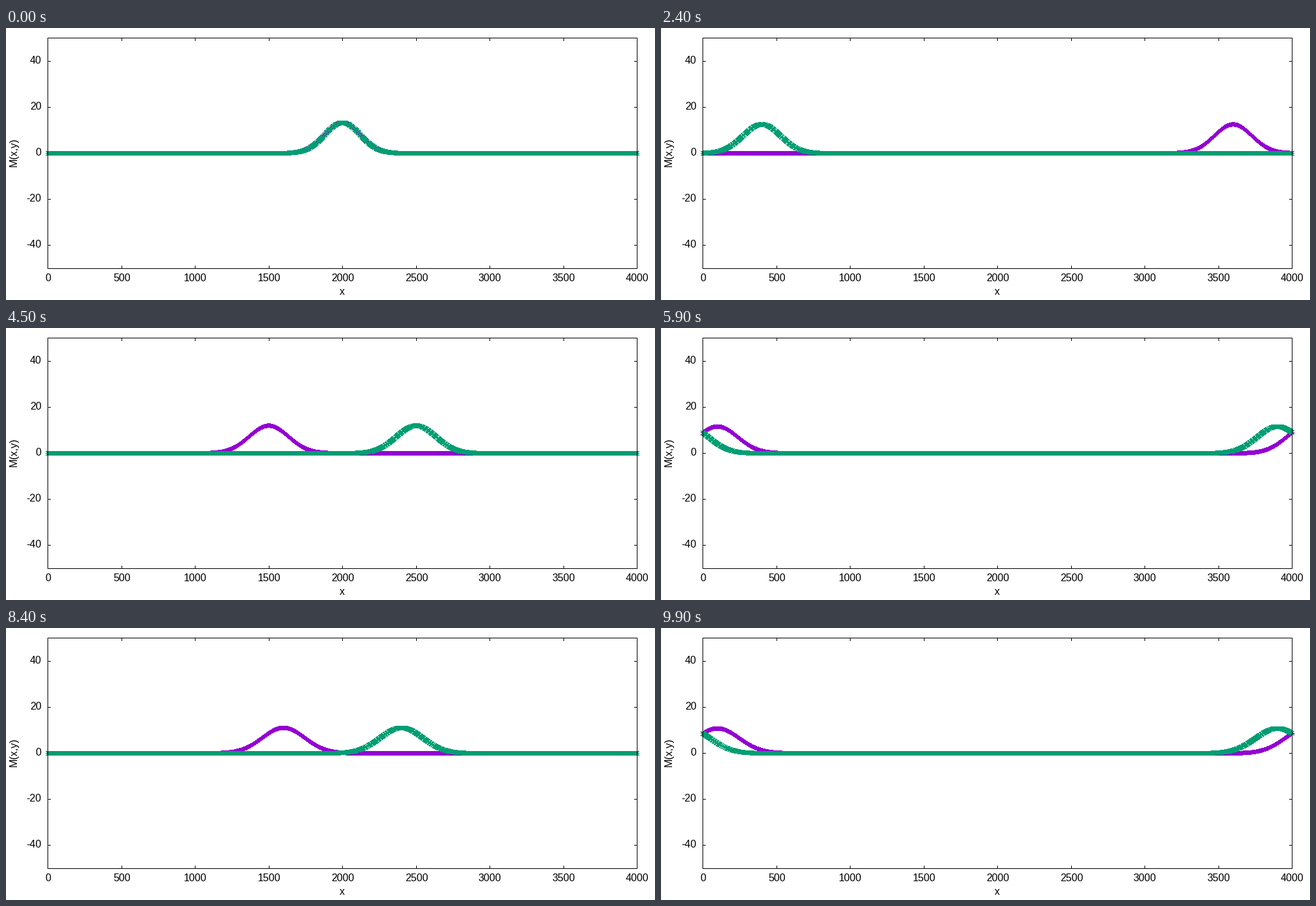
These frames come from a looping animation (1000 px wide and 420 px high, 10 s). A matplotlib script:

```python
import numpy as np
import matplotlib.pyplot as plt
from matplotlib.animation import FuncAnimation

W, H, DPI = 1000, 420, 100
LEFT, RIGHT, TOP, BOTTOM = 64, 972, 15, 371
SPAN, YMAX = 4000, 50
FRAMES, INTERVAL = 100, 100

PURPLE, GREEN, BLACK = (148, 0, 211), (0, 158, 115), (0, 0, 0)
ARM = 3      # half size of a marker
TICK = 4     # tick length beyond the border

# pulse: mass, start width, spreading and skew gained per step
MASS, SIGMA, SPREAD, SKEW = 4000, 120, 75, -272
SPEED = 100

grid = np.arange(SPAN + 1)


def col(x):
    return LEFT + np.floor(x * (RIGHT - LEFT) / SPAN + 0.5).astype(int)


def row(y):
    up = (y + YMAX) * (BOTTOM - TOP) / (2 * YMAX)
    return BOTTOM - np.floor(up + 0.5).astype(int)


def pulse(n):
    """Right-moving pulse on a periodic line after n steps."""
    d = (grid - SPEED * n) % SPAN - SPAN / 2
    s = np.sqrt(SIGMA ** 2 + SPREAD * n)
    z = d / s
    bell = MASS / (s * np.sqrt(2 * np.pi)) * np.exp(-z * z / 2)
    return bell * (1 + SKEW * n / (6 * s ** 3) * (z ** 3 - 3 * z))


def draw_ticks(img):
    for c in col(np.arange(0, SPAN + 1, 500)):
        img[BOTTOM - TICK:BOTTOM, c] = BLACK
        img[TOP:TOP + TICK + 1, c] = BLACK
    for r in row(np.arange(-40, 41, 20)):
        img[r, LEFT:LEFT + TICK + 1] = BLACK
        img[r, RIGHT - TICK:RIGHT + 1] = BLACK


def draw_border(img):
    img[[TOP, BOTTOM], LEFT:RIGHT + 1] = BLACK
    img[TOP:BOTTOM + 1, [LEFT, RIGHT]] = BLACK


def render(n):
    img = blank.copy()
    y = pulse(n)
    c, right, left = col(grid), row(y), row(y[::-1])
    for k in range(-ARM, ARM + 1):
        img[left + k, c] = PURPLE
        img[left, c + k] = PURPLE
    for k in range(-ARM, ARM + 1):
        img[right + k, c + k] = GREEN
        img[right + k, c - k] = GREEN
    draw_border(img)
    return img


def label(x, y, text, **kw):
    fig.text(x / W, 1 - y / H, text, family="Liberation Sans",
             size=16 * 72 / DPI, color="black", **kw)


blank = np.full((H, W, 3), 255, np.uint8)
draw_ticks(blank)

fig = plt.figure(figsize=(W / DPI, H / DPI), dpi=DPI, facecolor="white")
ax = fig.add_axes([0, 0, 1, 1])
ax.axis("off")
stage = ax.imshow(render(0), interpolation="nearest", aspect="auto")

for v in range(0, SPAN + 1, 500):
    label(col(v) + 0.5, 391, str(v), ha="center", va="baseline")
for v in range(-40, 41, 20):
    label(54.5, row(v) + 4, str(v), ha="right", va="baseline")
label(517.5, 412, "x", ha="center", va="baseline")
label(20, 191.5, "M(x,y)", rotation=90, ha="right", va="center")


def update(n):
    stage.set_data(render(n))
    return [stage]


anim = FuncAnimation(fig, update, frames=FRAMES, interval=INTERVAL,
                     init_func=lambda: update(0), repeat=True, repeat_delay=0)
plt.show()
```
